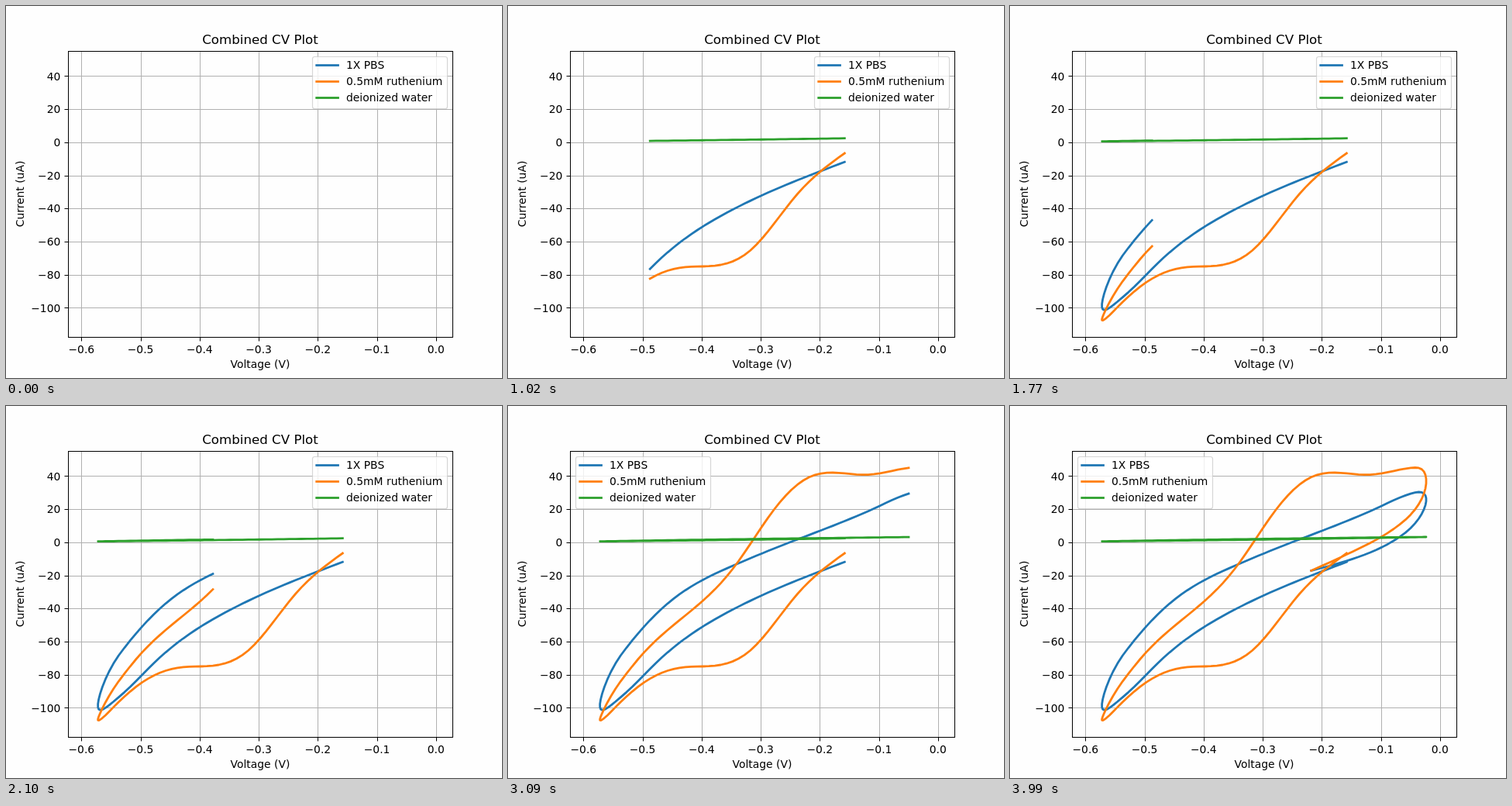
Animation, 640 px wide and 480 px high, one loop 4020 ms. Source, as an HTML page:

```html
<!DOCTYPE html>
<html lang="en">
<head>
<meta charset="utf-8">
<title>Combined CV Plot</title>
<style>
  html, body { margin: 0; width: 100%; height: 100%; overflow: hidden; background: #fefefe; }
  svg { display: block; width: 640px; height: 480px; }
  text { font: 13.89px "DejaVu Sans", sans-serif; fill: #000; }
  .title { font-size: 16.67px; }
  .mid { text-anchor: middle; }
  .end { text-anchor: end; }
  .grid { stroke: #b0b0b0; }
  .axis { stroke: #000; fill: none; }
  .curve { fill: none; stroke-width: 2.78; stroke-linecap: square; stroke-linejoin: round; }
</style>
</head>
<body>
<svg id="plot" viewBox="0 0 640 480">
  <g id="grid"></g>
  <g id="curves"></g>
  <g id="axes"><rect class="axis" x="80.5" y="58.5" width="496" height="369"/></g>
  <text class="title mid" x="328" y="49">Combined CV Plot</text>
  <text class="mid" x="328" y="467">Voltage (V)</text>
  <text class="mid" transform="translate(23 242.5) rotate(-90)">Current (uA)</text>
  <g id="legend">
    <rect x="395.5" y="65.5" width="174" height="67" rx="2.8" fill="#fff" fill-opacity=".8" stroke="#ccc" stroke-opacity=".8" stroke-width="1.2"/>
  </g>
</svg>
<script>
const LOOP = 4020, STEP = 30, POINTS = 133;
const SPEED = 7.61, LOW_TURN = 46.5, HIGH_TURN = 109.5, LOW_X = 88.1, BLEND = 16;
const LEGEND_SHIFT = -308, LEGEND_MOVES_AT = 87;

// Distance from a turning point, rounded to a parabola close to it.
function softAbs(d) {
  return Math.abs(d) > BLEND / 2 ? Math.abs(d) : d * d / BLEND + BLEND / 4;
}

// The voltage sweeps down, up and down again at constant speed.
function sweepX(k) {
  const peakX = LOW_X + SPEED * (HIGH_TURN - LOW_TURN);
  return k < (LOW_TURN + HIGH_TURN) / 2
    ? LOW_X + SPEED * softAbs(k - LOW_TURN)
    : peakX - SPEED * softAbs(k - HIGH_TURN);
}

// Natural cubic spline through [sample, y] key points.
function spline(keys) {
  const last = keys.length - 1, c = [0], r = [0], bend = Array(last + 1).fill(0);
  const gap = i => keys[i + 1][0] - keys[i][0];
  const rise = i => (keys[i + 1][1] - keys[i][1]) / gap(i);
  for (let i = 1; i < last; i++) {
    const p = 2 * (gap(i - 1) + gap(i)) - gap(i - 1) * c[i - 1];
    c[i] = gap(i) / p;
    r[i] = (6 * (rise(i) - rise(i - 1)) - gap(i - 1) * r[i - 1]) / p;
  }
  for (let i = last - 1; i > 0; i--) bend[i] = r[i] - c[i] * bend[i + 1];
  return k => {
    let i = 0;
    while (i < last - 1 && k > keys[i + 1][0]) i++;
    const h = gap(i), u = (k - keys[i][0]) / h, v = 1 - u;
    return v * keys[i][1] + u * keys[i + 1][1]
      + h * h / 6 * ((v ** 3 - v) * bend[i] + (u ** 3 - u) * bend[i + 1]);
  };
}

// Almost a straight line, slightly higher on the upward sweep.
function waterY(k) {
  const lift = 0.4 * Math.sin(Math.PI * (k - LOW_TURN) / (HIGH_TURN - LOW_TURN));
  return 174.7 - 0.0136 * (sweepX(k) - 118.5) - lift;
}

const series = [
  {
    name: "1X PBS", color: "#1f77b4",
    y: spline([[1, 201.3], [21, 266.8], [33, 331.7], [40, 381.5], [44, 392.3], [48, 378.5],
      [54, 322], [62, 254.8], [73, 206.3], [80, 184], [98, 128.7], [105, 111],
      [110, 123], [118, 168.8], [124, 192], [133, 212.5]])
  },
  {
    name: "0.5mM ruthenium", color: "#ff7f0e",
    y: spline([[1, 190], [9, 242.5], [17, 315.5], [22, 334], [29, 337.8], [37, 368.3],
      [41, 394.5], [45, 405.7], [49, 396.3], [57, 326.5], [66, 264], [73, 210.5],
      [80, 134], [86, 91.8], [90, 86], [96, 88.6], [103, 79.9], [106, 81.6],
      [110, 100], [119, 158.5], [124, 180.5], [133, 212.5]])
  },
  { name: "deionized water", color: "#2ca02c", y: waterY }
];

const byId = id => document.getElementById(id);
function add(parent, tag, attrs, text) {
  const el = document.createElementNS("http://www.w3.org/2000/svg", tag);
  for (const key in attrs) el.setAttribute(key, attrs[key]);
  if (text) el.textContent = text;
  return parent.appendChild(el);
}
const path = (parent, cls, d, extra) => add(parent, "path", { class: cls, d, ...extra });
const signed = (v, digits) => v.toFixed(digits).replace("-", "\u2212");
const snap = v => Math.round(v) + 0.5;

const grid = byId("grid"), axes = byId("axes"), legend = byId("legend");
for (let i = 0; i < 7; i++) {
  const x = 97.3 + 76.25 * i;
  path(grid, "grid", `M${snap(x)} 58V427`);
  path(axes, "axis", `M${snap(x)} 428v4.5`);
  add(axes, "text", { class: "mid", x, y: 448 }, signed((i - 6) / 10, 1));
}
for (let i = 0; i < 8; i++) {
  const y = 90.4 + 42.72 * i;
  path(grid, "grid", `M81 ${snap(y)}H576`);
  path(axes, "axis", `M80 ${snap(y)}h-4.5`);
  add(axes, "text", { class: "end", x: 70.3, y: Math.round(y + 5.2) }, signed(40 - 20 * i, 0));
}
series.forEach((s, row) => {
  s.line = path(byId("curves"), "curve", "", { stroke: s.color });
  s.points = Array.from({ length: POINTS }, (_, i) =>
    `${sweepX(i + 1).toFixed(2)} ${s.y(i + 1).toFixed(2)}`);
  path(legend, "curve", `M400.7 ${76.5 + 21 * row}h27.8`, { stroke: s.color });
  add(legend, "text", { x: 439, y: 81 + 21 * row }, s.name);
});

function draw(ms) {
  const count = Math.floor((ms % LOOP) / STEP);
  for (const s of series) {
    s.line.setAttribute("d", count > 1 ? "M" + s.points.slice(0, count).join("L") : "");
  }
  legend.setAttribute("transform", `translate(${count < LEGEND_MOVES_AT ? 0 : LEGEND_SHIFT} 0)`);
}

let start;
function tick(now) {
  start ??= now;
  draw(now - start);
  requestAnimationFrame(tick);
}
draw(0);
requestAnimationFrame(tick);
</script>
</body>
</html>
```
